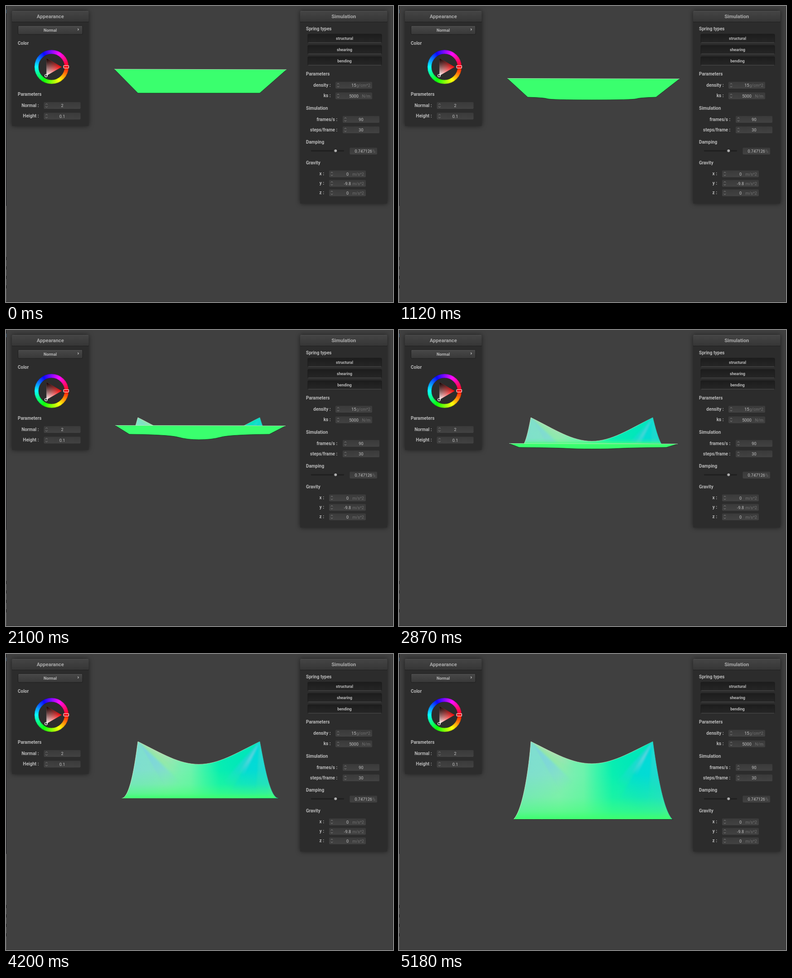
An HTML page with a canvas for the animation above (5.25 s loop, 854 by 656 pixels).

```html
<!DOCTYPE html>
<html lang="en">
<head>
<meta charset="utf-8">
<title>Cloth simulation</title>
<style>
html, body { margin: 0; width: 100%; height: 100%; overflow: hidden; background: #404040; }
canvas { display: block; }
</style>
</head>
<body>
<canvas id="stage" width="854" height="656"></canvas>
<script>
const stage = document.getElementById('stage');
let g = stage.getContext('2d');
const TAU = Math.PI * 2;
const clamp = (v, a = 0, b = 1) => Math.min(b, Math.max(a, v));

// Interpolates every column of a table keyed by its first column.
function sample(rows, x) {
  const last = rows.length - 1;
  x = clamp(x, rows[0][0], rows[last][0]);
  let k = 0;
  while (k < last - 1 && x > rows[k + 1][0]) k++;
  const a = rows[k], b = rows[k + 1], p = (x - a[0]) / (b[0] - a[0]);
  return a.map((v, j) => v + (b[j] - v) * p);
}

function fade(x0, y0, x1, y1, ...stops) {
  const f = g.createLinearGradient(x0, y0, x1, y1);
  stops.forEach(([at, color]) => f.addColorStop(at, color));
  return f;
}

function box(x, y, w, h, r, fill, line) {
  g.beginPath();
  g.roundRect(x, y, w, h, r);
  g.fillStyle = fill;
  g.fill();
  if (line) { g.strokeStyle = line; g.lineWidth = 1; g.stroke(); }
}

function text(s, x, y, size = 10, align = 'left', weight = 700, color = '#b9b9b9') {
  g.font = `${weight} ${size}px Roboto, sans-serif`;
  g.textAlign = align;
  g.fillStyle = color;
  g.fillText(s, x, y + size * .36);
}

function polyline(color, width, ...pts) {
  g.beginPath();
  pts.forEach(([x, y]) => g.lineTo(x, y));
  g.strokeStyle = color;
  g.lineWidth = width;
  g.stroke();
}

function ring(cx, cy, r, color, width) {
  g.beginPath();
  g.arc(cx, cy, r, 0, TAU);
  g.strokeStyle = color;
  g.lineWidth = width;
  g.stroke();
}

// ---------- panels ----------

function panel(title, x, y, w, h) {
  g.save();
  g.shadowColor = 'rgba(0,0,0,.55)';
  g.shadowBlur = 11;
  box(x, y, w, h, 2, '#2c2c2c');
  g.restore();
  box(x, y, w, 24, 2, fade(0, y, 0, y + 24, [0, '#454545'], [1, '#363636']));
  polyline('#505050', 1, [x + 1, y + .5], [x + w - 1, y + .5]);
  polyline('#1e1e1e', 1, [x, y + 24.5], [x + w, y + 24.5]);
  text(title, x + w / 2, y + 12.3, 11.2, 'center', 700, '#aaa');
}

function pushed(label, cy) {
  box(666, cy - 9.5, 163, 19, 2, fade(0, cy - 10, 0, cy + 10, [0, '#1c1c1c'], [1, '#262626']), '#1b1b1b');
  polyline('#555', 1, [667, cy + 9.5], [828, cy + 9.5]);
  text(label, 747, cy, 8.75, 'center');
}

function field(x, cy, w, value, unit, label, labelEnd) {
  box(x, cy - 7.5, w, 15, 2, fade(0, cy - 8, 0, cy + 8, [0, '#3a3a3a'], [1, '#424242']));
  if (label) {
    text(label + ' :', labelEnd, cy - .3, 10, 'right');
    const c = x + 6;
    polyline('#858585', 1, [c - 2.3, cy - 2], [c, cy - 4], [c + 2.3, cy - 2]);
    polyline('#858585', 1, [c - 2.3, cy + 2], [c, cy + 4], [c + 2.3, cy + 2]);
  }
  text(value, x + w / 2, cy + .5, 9.2, 'center', 400, '#c4c4c4');
  if (unit) text(unit, x + w - 4, cy + .5, 9.2, 'right', 400, '#707070');
}

function wheel(cx, cy) {
  const hues = g.createConicGradient(0, cx, cy);
  for (let k = 0; k <= 6; k++) hues.addColorStop(k / 6, `hsl(${k * 60} 100% 52%)`);
  ring(cx, cy, 33.2, hues, 9);
  ring(cx, cy, 37.4, 'rgba(0,0,0,.25)', 1);
  ring(cx, cy, 29, 'rgba(0,0,0,.25)', 1);

  const pts = [0, 1, 2].map(k => [cx + 22.5 * Math.cos(k * TAU / 3), cy + 22.5 * Math.sin(k * TAU / 3)]);
  const [red, white, black] = pts;
  g.beginPath();
  pts.forEach(p => g.lineTo(...p));
  g.closePath();
  g.fillStyle = fade(...red, ...white, [0, '#f00'], [1, '#fff']);
  g.fill();
  g.fillStyle = fade((red[0] + white[0]) / 2, (red[1] + white[1]) / 2, ...black, [0, '#0000'], [1, '#000']);
  g.fill();

  ring(88.5, 154.3, 2.8, '#fff', 1.2);
  box(127, 132, 11.5, 5.5, .5, '#f01018', '#fff');
}

function drawInterface() {
  g.fillStyle = '#404040';
  g.fillRect(0, 0, 854, 656);
  g.fillStyle = '#1b1d20';
  g.fillRect(0, 0, 1, 443);
  g.fillStyle = '#5a5a5a';
  g.fillRect(0, 443, 1, 213);
  g.fillStyle = '#222';
  [556, 577, 598, 619].forEach(y => g.fillRect(0, y, 1, 7));
  g.fillStyle = '#2f5878';
  g.fillRect(0, 8, 1, 8);
  g.fillStyle = '#343434';
  g.fillRect(853, 0, 1, 656);
  g.fillRect(0, 655, 854, 1);

  panel('Appearance', 13, 11, 169.5, 255);
  box(26.5, 44, 142.5, 19, 2, fade(0, 44, 0, 63, [0, '#484848'], [1, '#383838']), '#1d1d1d');
  polyline('#565656', 1, [27.5, 45], [168, 45]);
  text('Normal', 97.5, 53.7, 8.75, 'center');
  polyline('#c0c0c0', 1.1, [158.3, 50], [160.3, 52], [158.3, 54]);
  text('Color', 26, 82);
  wheel(100.5, 135);
  text('Parameters', 26, 195);
  field(83.5, 220.5, 81, '2', '', 'Normal', 72.5);
  field(83.5, 244, 81, '0.1', '', 'Height', 72.5);

  panel('Simulation', 649, 11, 192.5, 427);
  text('Spring types', 662, 50.3);
  ['structural', 'shearing', 'bending'].forEach((s, k) => pushed(s, 71.7 + k * 25));
  text('Parameters', 662, 150.3);
  field(727, 175.5, 81, '15', 'g/cm^2', 'density', 716.5);
  field(727, 199, 81, '5000', 'N/m', 'ks', 716.5);
  text('Simulation', 662, 226);
  field(743, 251.3, 81, '90', '', 'frames/s', 731.3);
  field(743, 274.5, 81, '30', '', 'steps/frame', 731.3);
  text('Damping', 662, 301.7);
  box(673, 319.5, 73, 3, 1.5, '#1f1f1f');
  box(722.5, 316.5, 9, 9, 4.5, '#3c3c3c', '#222');
  box(724.5, 318, 5.6, 5.6, 2.8, '#b0b0b0');
  field(758.5, 321.5, 60.5, '0.747126', '%');
  text('Gravity', 662, 347.5);
  ['x', 'y', 'z'].forEach((s, k) =>
    field(713, 372 + k * 21, 81, k === 1 ? '-9.8' : '0', 'm/s^2', s, 702));
}

// ---------- cloth ----------

// step, height of the free edge
const fall = [[16, 161], [22, 183], [23, 183], [30, 212], [41, 252], [51, 289], [60, 319.7], [74, 366.3]];

// free edge y, its corner x, then three contour points of the underside
const under = [
  [140.5, 239, 291, 193, 320, 193, 335, 193],
  [161, 239, 284, 202, 320, 203, 335, 208],
  [212, 241, 272, 231, 360, 232, 400, 243],
  [252, 243, 265, 260, 350, 261, 390, 263.5],
  [289, 247, 262, 290.5, 350, 290.5, 390, 290.5],
  [320, 255, 256, 320.5, 350, 320.5, 390, 320.5],
  [367, 253, 254, 367.2, 350, 367.2, 390, 367.2]
];

// free edge y, two control points and the foot x of the hanging side
const side = [
  [161, 295, 183, 296, 172, 300],
  [212, 289, 200, 288, 206, 286],
  [252, 287, 215, 282, 240, 276],
  [289, 286, 235, 274, 284, 264],
  [320, 285, 240, 274, 320, 255],
  [367, 287, 250, 274, 345, 253]
];

// direction in degrees (from, to), reach, colour; rays from each pinned corner
const rays = {
  left: [
    [24, 34, 110, '186,220,172'], [34, 42, 115, '160,230,158'],
    [44, 60, 130, '124,208,228'], [60, 104, 130, '126,220,212']
  ],
  right: [
    [24, 46, 120, '0,232,182'], [48, 60, 120, '40,212,216'],
    [60, 86, 150, '0,216,220'], [86, 104, 110, '40,214,212'],
    [56, 65, 85, '128,208,228']
  ]
};

const mirror = (x, y) => [851 - x + clamp((y - 200) * .07, 0, 5), y];

function edgeY(step) {
  if (step < 16) return 140.5 + 20.5 * clamp((step - 8) / 8) ** 1.5;
  return sample(fall, step)[1];
}

function drawRays(px, dir, list, alpha) {
  for (const [from, to, reach, rgb] of list) {
    const glow = g.createRadialGradient(px, 194, 0, px, 194, reach);
    glow.addColorStop(0, `rgba(${rgb},${alpha})`);
    glow.addColorStop(.5, `rgba(${rgb},${alpha * .75})`);
    glow.addColorStop(1, `rgba(${rgb},0)`);
    g.beginPath();
    g.moveTo(px, 194);
    for (const deg of [from, to]) {
      const a = deg * TAU / 360;
      g.lineTo(px + dir * 260 * Math.cos(a), 194 + 260 * Math.sin(a));
    }
    g.fillStyle = glow;
    g.fill();
  }
}

function drawCurtain(y) {
  const [, ax, ay, bx, by, foot] = sample(side, y);
  const mid = 246.5 - Math.max(0, y - 250) * .03;
  const shape = new Path2D();
  shape.moveTo(291, 194);
  shape.bezierCurveTo(345, 221, 382, mid, 425.5, mid);
  shape.bezierCurveTo(469, mid, 506, 221, 560, 194);
  shape.bezierCurveTo(...mirror(ax, ay), ...mirror(bx, by), ...mirror(foot, y));
  shape.lineTo(foot, y);
  shape.bezierCurveTo(bx, by, ax, ay, 291, 194);

  g.save();
  g.beginPath();
  g.rect(230, 180, 400, y - 180);
  g.clip();
  g.save();
  g.clip(shape);
  g.fillStyle = fade(255, 0, 603, 0, [0, '#80e2c4'], [.28, '#88ecb6'], [.44, '#6cf2ac'],
    [.52, '#3cf4aa'], [.62, '#0af0b0'], [.78, '#04e6c0'], [.92, '#14dccc'], [1, '#52e2b8']);
  g.fillRect(230, 180, 400, 200);
  g.filter = 'blur(2px)';
  const strength = clamp((y - 170) / 130, .35, .9);
  drawRays(291, 1, rays.left, strength);
  drawRays(560, -1, rays.right, strength);
  g.filter = 'none';
  const start = 238 + Math.max(0, y - 245) * .25;
  if (y > start) {
    g.fillStyle = fade(0, start, 0, y, [0, '#4cff7c00'], [.5, '#4cff7c38'], [.82, '#46ff78a0'], [1, '#3cff6e']);
    g.fillRect(230, start, 400, y - start);
  }
  g.restore();
  g.strokeStyle = fade(291, 0, 564, 0, [0, '#cde2becc'], [.85, '#b4deb4cc'], [1, '#2cc8b4cc']);
  g.lineWidth = 1;
  g.stroke(shape);
  g.restore();
}

function drawUnderside(y) {
  const [, corner, ax, ay, bx, by, cx, cy] = sample(under, y);
  const tilt = y < 300 ? .5 : 0;
  const left = [corner, y - tilt], right = [858 - corner, y + tilt];
  const between = [(bx + cx) / 2, (by + cy) / 2];
  const contour = new Path2D();
  contour.moveTo(...left);
  contour.lineTo(ax, ay);
  contour.quadraticCurveTo(bx, by, ...between);
  contour.quadraticCurveTo(cx, cy, 425.5, cy);
  contour.quadraticCurveTo(...mirror(cx, cy), ...mirror(...between));
  contour.quadraticCurveTo(...mirror(bx, by), ...mirror(ax, ay));
  contour.lineTo(...right);
  g.fillStyle = '#3aff6e';
  g.fill(contour);
  g.strokeStyle = 'rgba(4,50,18,.75)';
  g.lineWidth = 1;
  g.stroke(contour);
  if (y < 300) polyline('rgba(190,238,196,.8)', 1, left, right);
}

// ---------- loop ----------

const backdrop = document.createElement('canvas');
backdrop.width = 854;
backdrop.height = 656;
const view = g;
g = backdrop.getContext('2d');
drawInterface();
g = view;

const begin = performance.now();
function frame() {
  const step = Math.floor((performance.now() - begin) % 5250 / 70);
  const y = edgeY(step);
  g.drawImage(backdrop, 0, 0);
  if (y > 195) drawCurtain(y);
  drawUnderside(y);
  requestAnimationFrame(frame);
}
frame();
</script>
</body>
</html>
```
